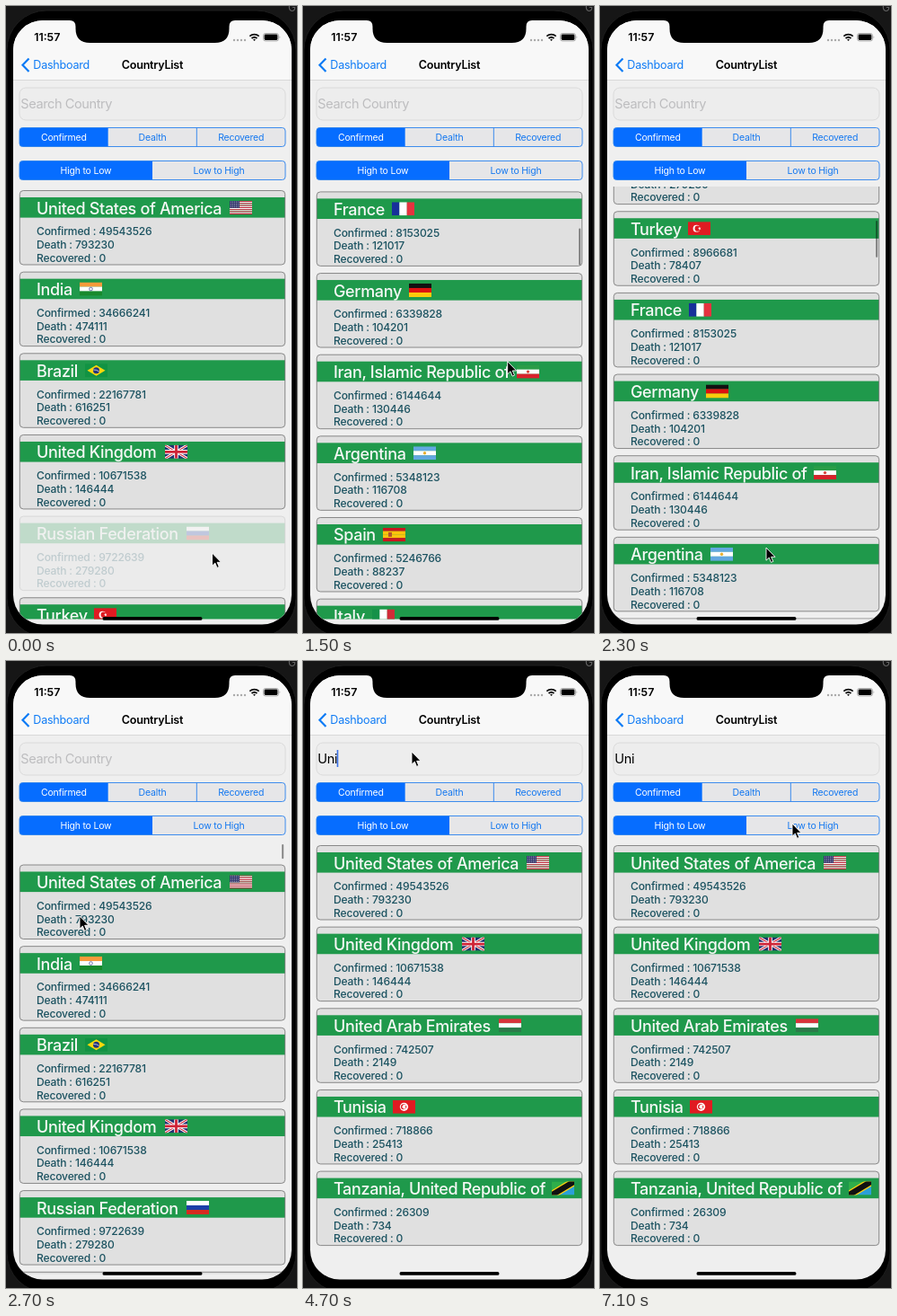
An HTML page that plays this animation: 324 by 698 pixels, repeating every 7.2 s.

```html
<!DOCTYPE html>
<html lang="en">
<head>
<meta charset="utf-8">
<title>CountryList</title>
<style>
  html, body { margin: 0; width: 100%; height: 100%; overflow: hidden; background: #101010; }
  svg { display: block; }
  text { font-family: Inter, Roboto, sans-serif; white-space: pre; }
  .name { font-size: 18px; font-weight: 500; letter-spacing: -.019em; fill: #f6f8f6; }
  .row { font-size: 12.1px; font-weight: 500; letter-spacing: -.015em; fill: #1b5260; }
  .seg { font-size: 10.5px; letter-spacing: -.02em; text-anchor: middle; fill: #1478f0; }
  .seg.on { fill: #fff; }
  .field { font-size: 14.6px; letter-spacing: -.03em; }
  .nav { font-size: 12.6px; letter-spacing: -.02em; }
  .bold { font-weight: 600; }
</style>
</head>
<body>
<svg width="324" height="698" viewBox="0 0 324 698">
  <defs>
    <clipPath id="screen"><rect x="8" y="16" width="310" height="672.5" rx="33"/></clipPath>
    <clipPath id="view"><rect x="8" y="201" width="310" height="481.6"/></clipPath>
  </defs>
  <rect width="324" height="698" fill="#161616"/>
  <rect x="1" y="5" width="322" height="698" rx="44" stroke="#1e1e1e"/>
  <text x="314" y="6" font-size="12" fill="#666">Gi</text>

  <g clip-path="url(#screen)">
    <rect x="8" y="16" width="310" height="674" fill="#efefef"/>
    <rect x="8" y="16" width="310" height="66" fill="#f8f8f8"/>
    <path d="M8 82.5H318" stroke="#d4d4d4" stroke-width=".8"/>

    <text class="bold" x="31.2" y="39" font-size="12.4">11:57</text>
    <g fill="#aaa">
      <circle cx="254" cy="38" r="1.2"/><circle cx="258" cy="38" r="1.2"/>
      <circle cx="262" cy="38" r="1.2"/><circle cx="266" cy="38" r="1.2"/>
    </g>
    <g fill="none" stroke="#111" stroke-width="1.8">
      <path d="M271.3 33.6a7.6 7.6 0 0 1 10.4 0M273.5 36a4.6 4.6 0 0 1 6 0"/>
      <path d="M276.5 39l-1.4-1.6a2 2 0 0 1 2.8 0z" fill="#111" stroke="none"/>
    </g>
    <rect x="286.5" y="30.5" width="17" height="8.5" rx="2.4" fill="none" stroke="#999" stroke-width=".8"/>
    <rect x="287.6" y="31.6" width="14.8" height="6.3" rx="1.4"/>
    <path d="M304.6 33.3q1.5 1.4 0 2.9z" fill="#999"/>

    <path d="M25.5 58.5l-7 7.3 7 7.3" fill="none" stroke="#0f7bf5" stroke-width="2.2"/>
    <text class="nav" x="30.3" y="70.3" fill="#0f7bf5">Dashboard</text>
    <text class="nav bold" x="163" y="70.3" text-anchor="middle">CountryList</text>

    <rect x="15" y="91" width="296" height="36" rx="7" fill="#ededed" stroke="#dadada"/>
    <text id="hint" class="field" x="16.3" y="114.2" fill="#bdbdbf">Search Country</text>
    <text id="typed" class="field" x="16.3" y="114.2"></text>
    <rect id="caret" y="99" width="1.6" height="19" fill="#3b72e8"/>

    <g id="segments"></g>
    <g clip-path="url(#view)">
      <g id="list"></g>
      <rect id="bar" x="307" width="2.2" rx="1.1" fill="#000" fill-opacity=".4"/>
    </g>
    <path d="M71 15v1q6.5 0 6.5 7v2q0 16 16 16H232.5q16 0 16-16v-2q0-7 6.5-7v-1z"/>
    <rect x="107.5" y="680" width="111" height="3.8" rx="1.9"/>
  </g>
  <path id="mouse" d="M0 0V14.2L3.3 11.1 5.5 16.4 7.8 15.4 5.6 10.3H10Z" stroke="#fff" stroke-width=".9"/>
</svg>

<script>
const $ = id => document.getElementById(id);
const LOOP = 7200, STEP = 100, TOP = 205.5, PITCH = 90.65;

// Flags live in a 25 x 15 box.
const box = (x, y, w, h, c) => `<rect x="${x}" y="${y}" width="${w}" height="${h}" fill="${c}"/>`;
const dot = (x, y, r, c) => `<circle cx="${x}" cy="${y}" r="${r}" fill="${c}"/>`;
const line = (d, c, w) => `<path d="${d}" stroke="${c}" stroke-width="${w}" fill="none"/>`;
const area = (d, c) => `<path d="${d}" fill="${c}"/>`;
const across = (...cs) => cs.map((c, i) => box(0, i * 15 / cs.length, 25, 15 / cs.length + .1, c)).join('');
const upright = (...cs) => cs.map((c, i) => box(i * 25 / cs.length, 0, 25 / cs.length + .1, 15, c)).join('');
const star = (x, y, r, c) => {
  const pts = Array.from({ length: 10 }, (_, i) => {
    const a = i * Math.PI / 5 + Math.PI, q = i % 2 ? r * .4 : r;
    return [x + q * Math.cos(a), y + q * Math.sin(a)].map(v => v.toFixed(2));
  });
  return `<polygon points="${pts.join(' ')}" fill="${c}"/>`;
};
const crescent = (x, r, back, front) =>
  dot(x, 7.5, r, front) + dot(x + r * .3, 7.5, r * .8, back) + star(x + r * .85, 7.5, r * .5, front);

const usFlag = () => {
  let s = across(...Array.from({ length: 13 }, (_, i) => i % 2 ? '#fff' : '#c0283c')) + box(0, 0, 11, 8, '#35396e');
  for (let i = 0; i < 20; i++) s += dot(1.3 + i % 5 * 2.1, 1.1 + (i / 5 | 0) * 1.9, .45, '#fff');
  return s;
};
const ukFlag = () => {
  const x = 'M0 0L25 15M25 0L0 15', plus = 'M12.5 0V15M0 7.5H25';
  return box(0, 0, 25, 15, '#22306f') + line(x, '#fff', 3) + line(x, '#cf2437', 1.1)
    + line(plus, '#fff', 4.6) + line(plus, '#cf2437', 2.8);
};

// name, confirmed, deaths, flag x, flag
const countries = [
  ['United States of America', 49543526, 793230, 249, usFlag()],
  ['India', 34666241, 474111, 82, across('#f79a3a', '#fff', '#188a2c')
    + '<circle cx="12.5" cy="7.5" r="1.8" fill="none" stroke="#34398a" stroke-width=".7"/>'],
  ['Brazil', 22167781, 616251, 88, box(0, 0, 25, 15, '#119343')
    + area('M2.5 7.5L12.5 1.5 22.5 7.5 12.5 13.5Z', '#fcd80c') + dot(12.5, 7.5, 3.5, '#25347c')
    + line('M9.3 6.8Q13 6.6 15.7 8.7', '#fff', .7)],
  ['United Kingdom', 10671538, 146444, 177, ukFlag()],
  ['Russian Federation', 9722639, 279280, 201, across('#fff', '#1c3fa8', '#d62a20')],
  ['Turkey', 8966681, 78407, 98, box(0, 0, 25, 15, '#e01b22') + crescent(9.5, 3.9, '#e01b22', '#fff')],
  ['France', 8153025, 121017, 99, upright('#17309a', '#fff', '#e5333f')],
  ['Germany', 6339828, 104201, 118, across('#111', '#dd1111', '#fccb0c')],
  ['Iran, Islamic Republic of', 6144644, 130446, 238, across('#2a9d48', '#fff', '#d8222c') + dot(12.5, 7.5, 1.7, '#d8443c')],
  ['Argentina', 5348123, 116708, 123, across('#62a8e0', '#fff', '#62a8e0') + dot(12.5, 7.5, 1.7, '#e8b030')],
  ['Spain', 5246766, 88237, 89, across('#c8191f', '#fcc40c', '#fcc40c', '#c8191f') + box(6, 5, 4, 5, '#b5552c')],
  ['Italy', 5152264, 134472, 77, upright('#159148', '#fff', '#d02c38')],
  ['Colombia', 5081064, 128821, 122, across('#fcd20f', '#fcd20f', '#1d3d92', '#d01c30')],
  ['Indonesia', 4257685, 143867, 126, across('#d8202c', '#fff')],
  ['Mexico', 3900293, 295154, 103, upright('#11754c', '#fff', '#cc2030') + dot(12.5, 7.5, 2, '#9a7a44')],
  ['Ukraine', 3503226, 89126, 108, across('#2a62b8', '#fcd50c')],
  ['Hungary', 1152446, 35632, 112, across('#cc2a3e', '#fff', '#43704e')],
  ['United Arab Emirates', 742507, 2149, 218, across('#d8343c', '#fff', '#2c7a4a')],
  ['Tunisia', 718866, 25413, 100, box(0, 0, 25, 15, '#e01b22') + dot(12.5, 7.5, 4.6, '#fff') + crescent(12, 3, '#fff', '#e01b22')],
  ['Tanzania, United Republic of', 26309, 734, 277, box(0, 0, 25, 15, '#2fae4a') + area('M25 0V15H0Z', '#2b9fd8')
    + line('M-3 16.8L28-1.8', '#fcd20f', 9) + line('M-3 16.8L28-1.8', '#111', 6.4)],
];

const card = ([name, confirmed, deaths, x, flag]) => `<g>
  <rect x="15.3" width="295.4" height="82.5" rx="4" fill="#e0e0e0"/>
  <rect x="15.3" y="7.5" width="295.4" height="22.6" fill="#1f994b"/>
  <rect x="15.3" width="295.4" height="82.5" rx="4" fill="none" stroke="#707070" stroke-width=".8"/>
  <text class="name" x="34" y="26">${name}</text>
  <svg x="${x}" y="11.4" width="25" height="15" viewBox="0 0 25 15">${flag}</svg>
  ${['Confirmed : ' + confirmed, 'Death : ' + deaths, 'Recovered : 0']
    .map((s, i) => `<text class="row" x="34" y="${49.8 + i * 14.75}">${s}</text>`).join('')}
</g>`;
$('list').innerHTML = countries.map(card).join('');
const cards = [...$('list').children];

const segments = (y, labels) => {
  const w = 296 / labels.length;
  return `<rect x="15" y="${y}" width="296" height="21" rx="3.5" fill="#e6e6e8"/>
    <path d="M${15 + w} ${y}H18.5q-3.5 0-3.5 3.5v14q0 3.5 3.5 3.5H${15 + w}z" fill="#066dff"/>
    <rect x="15" y="${y}" width="296" height="21" rx="3.5" fill="none" stroke="#2a82ee" stroke-width=".9"/>`
    + labels.map((s, i) => (i > 1 ? line(`M${15 + i * w} ${y}v21`, '#2a82ee', .9) : '')
    + `<text class="seg${i ? '' : ' on'}" x="${15 + (i + .5) * w}" y="${y + 14.3}">${s}</text>`).join('');
};
$('segments').innerHTML = segments(135.5, ['Confirmed', 'Dealth', 'Recovered'])
  + segments(172.5, ['High to Low', 'Low to High']);

const clamp = v => Math.min(1, Math.max(0, v));

// Linear interpolation through [time, ...values] keys.
function track(keys, t) {
  const i = keys.findIndex(k => k[0] > t);
  if (i < 0) return keys[keys.length - 1].slice(1);
  if (!i) return keys[0].slice(1);
  const a = keys[i - 1], b = keys[i], p = (t - a[0]) / (b[0] - a[0]);
  return a.slice(1).map((v, j) => v + (b[j + 1] - v) * p);
}

const dragUp = t => 205 * clamp((t - 200) / 800) ** 3;

const pullDown = [[2000, 669], [2100, 630], [2200, 545], [2300, 430], [2400, 300], [2500, 140],
  [2600, 20], [2700, -21.5], [2800, -16], [2900, -9], [3000, -4], [3100, -1.5], [3200, 0]];

function scrollAt(t) {
  if (t <= 1000) return Math.max(0, dragUp(t) - 7);
  if (t < 2000) return 198 + 545 * (1 - Math.exp((1000 - t) / 500));
  return track(pullDown, t)[0];
}

const path = [[1000, 226, 404], [1900, 229, 389], [2000, 228, 392], [2200, 205, 520], [2400, 165, 686],
  [2500, 140, 684], [2700, 82, 284], [2900, 108, 135], [3050, 121, 101], [6500, 121, 101],
  [6700, 160, 140], [6900, 208, 178], [7000, 214, 181]];

function mouseAt(t) {
  return t < 1000 ? [229.5 - 3.5 * t / 1000, 609 - dragUp(t)] : track(path, t);
}

// Focus, typing and deleting: [time, length of the query]
const edits = [[3400, 0], [4300, 1], [4500, 2], [4700, 3], [4900, 4], [5100, 5], [5300, 6],
  [6000, 5], [6150, 4], [6300, 3]];

function draw(t) {
  const edit = edits.filter(e => e[0] <= t).pop();
  const query = edit ? 'United'.slice(0, edit[1]) : '';
  $('typed').textContent = query;
  $('hint').style.display = query ? 'none' : '';
  $('caret').style.display = edit && (t - edit[0]) % 1000 < 500 ? '' : 'none';
  $('caret').setAttribute('x', 16 + (query ? $('typed').getComputedTextLength() : 0));

  const scroll = scrollAt(t);
  let n = 0;
  cards.forEach((el, i) => {
    const shown = countries[i][0].toLowerCase().includes(query.toLowerCase());
    el.style.display = shown ? '' : 'none';
    if (shown) el.setAttribute('transform', `translate(0 ${TOP + PITCH * n++ - scroll})`);
  });
  cards[4].setAttribute('opacity', .22 + .78 * clamp((t - 200) / 300));

  const over = Math.max(0, -scroll);
  $('bar').setAttribute('y', over ? 204 : 205.8 + .077 * scroll);
  $('bar').setAttribute('height', 41 - Math.min(33, over * 1.15));
  $('bar').setAttribute('opacity', clamp((t - 500) / 200) * clamp((3500 - t) / 300));

  $('mouse').setAttribute('transform', `translate(${mouseAt(t)})`);
}

const start = performance.now();
function tick() {
  const t = (performance.now() - start) % LOOP;
  draw(Math.floor(t / STEP) * STEP);
  requestAnimationFrame(tick);
}
tick();
</script>
</body>
</html>
```
